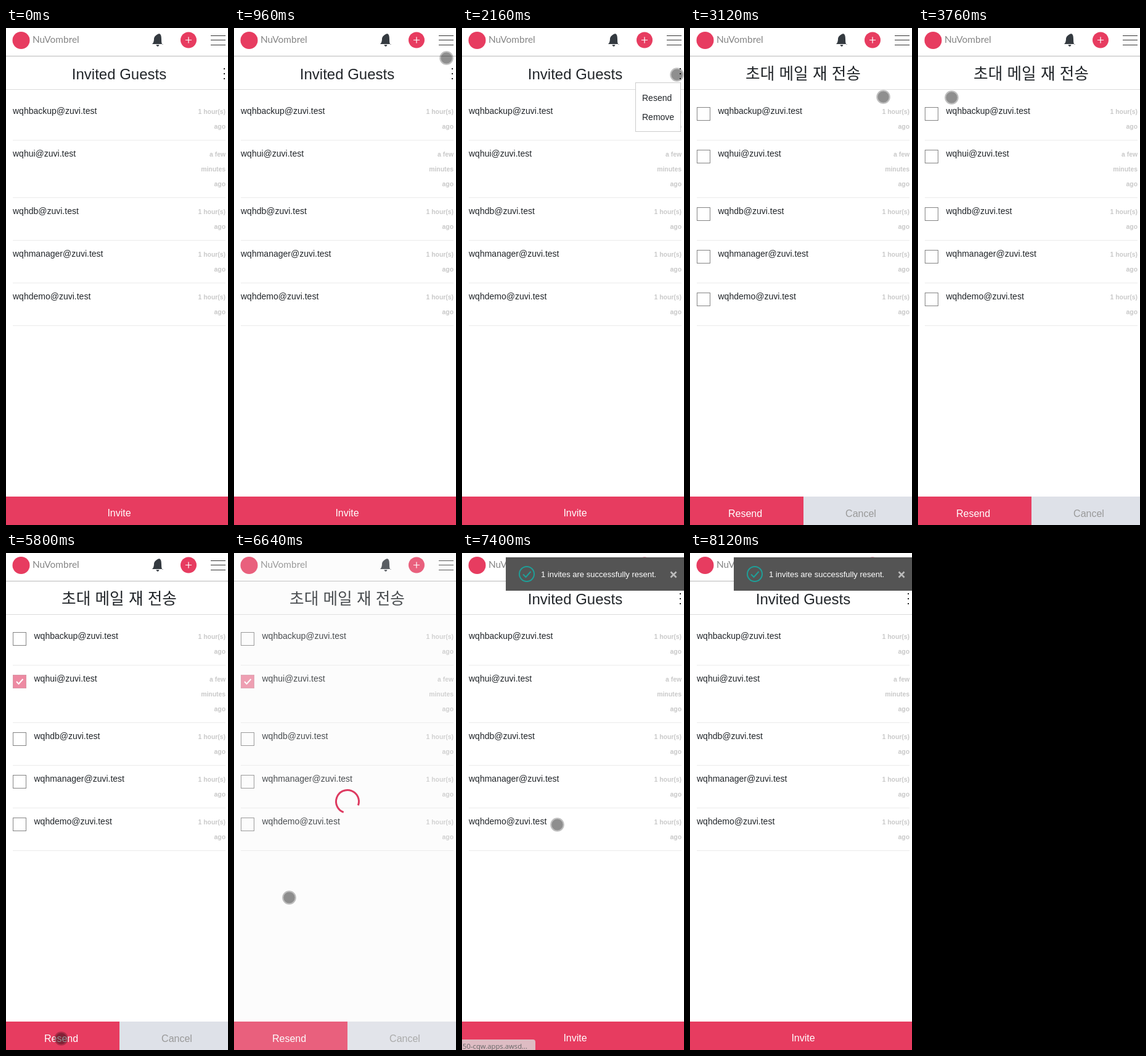
Animation, 360 px wide and 804 px high, one loop 9.56 s. Source, as an HTML page:

```html
<!DOCTYPE html>
<html lang="en">
<head>
<meta charset="utf-8">
<title>Invited guests</title>
<style>
  html, body { margin: 0; width: 100%; height: 100%; overflow: hidden; background: #fff; }
  svg { display: block; width: 100%; height: 100%; }
  text { font: 14px "Liberation Sans", Arial, sans-serif; fill: #212529; }
  .title { font-size: 24px; }
  .korean { font-size: 25.7px; font-weight: 300; font-family: "Liberation Sans", "Noto Sans CJK KR", "Noto Sans CJK", sans-serif; }
  .age { font-size: 10.4px; font-weight: bold; fill: #c9c9c9; }
  .button { font-size: 16px; fill: #fff; }
  .muted { fill: #999; }
  .brand { font: 15.4px Lato, sans-serif; fill: #858585; }
  .notice { font-size: 13px; fill: #fff; }
  .status { font: 11.3px "Open Sans", sans-serif; fill: #666; }
</style>
</head>
<body>
<svg viewBox="0 0 360 804" id="stage"></svg>
<script>
const LOOP = 9560, STEP = 40;
const PINK = '#e73c60';

// Moments at which the interface changes, in ms
const MENU_OPEN = 1920, SELECT_PAGE = 3000, TICK = 4280, LOADING = 5920,
      LOADED = 6840, NOTICE = 6960, STATUS_OFF = 7640;

// Each row is as tall as its age text
const HOUR = ['1 hour(s)', 'ago'], MINUTES = ['a few', 'minutes', 'ago'];
const LINE = 24, ROW_GAP = 21;
let rowTop = 128;
const guests = ['backup', 'ui', 'db', 'manager', 'demo'].map(role => {
  const age = role === 'ui' ? MINUTES : HOUR;
  const guest = { mail: `wqh${role}@zuvi.test`, age, y: rowTop };
  rowTop += ROW_GAP + LINE * age.length;
  return guest;
});

// Where the pointer goes; it rests where it leaves later than it arrives
const stop = (x, y, arrive, leave = arrive) => ({ x, y, arrive, leave });
const stops = [
  stop(184, 244, 320),
  stop(344, 48, 960),
  stop(360, 82, 1320, 1480),
  stop(358, 75, 1640, 2120),    // menu button
  stop(348, 75, 2160),
  stop(313, 111, 2480, 3120),   // menu entry
  stop(54, 112, 3760),
  stop(22, 207, 4120, 4440),    // checkbox
  stop(14, 417, 5040),
  stop(89, 785, 5760, 6080),    // resend button
  stop(89, 557, 6640),
  stop(154, 439, 7400),
  stop(190, 330, 7760),
  stop(335, 312, 8120)
];

const text = (x, y, content, cls = '', anchor = 'start') =>
  `<text x="${x}" y="${y}" class="${cls}" text-anchor="${anchor}">${content}</text>`;
const rect = (x, y, w, h, fill, extra = '') =>
  `<rect x="${x}" y="${y}" width="${w}" height="${h}" fill="${fill}" ${extra}/>`;
const line = (d, color, width = 1, extra = '') =>
  `<path d="${d}" fill="none" stroke="${color}" stroke-width="${width}" ${extra}/>`;
const circle = (x, y, r, fill, extra = '') =>
  `<circle cx="${x}" cy="${y}" r="${r}" fill="${fill}" ${extra}/>`;
const group = (id, ...parts) => `<g id="${id}">${parts.join('')}</g>`;

const header = [
  circle(24.5, 20, 14, PINK),
  text(43, 24, 'NuVombrel', 'brand'),
  '<path fill="#343a40" d="M237 26Q240 23 240 18T246 10T252 18T255 26ZM243.5 27.3H248.5Q248 30 246 30T243.5 27.3Z"/>',
  circle(296, 19.5, 13, PINK),
  line('M291 19.5h10m-5 -5v10', '#fff', 1.2),
  line('M332 12.5h24m-24 7h24m-24 8h24', '#333'),
  rect(0, 45, 360, 1, '#b9b9b9'),
  rect(0, 99, 360, 1, '#dcdcdc')
];

const ages = guests.map(({ y, age }) =>
  age.map((part, i) => text(356, y + 11 + i * LINE, part, 'age', 'end')).join('') +
  rect(11, y + 5 + age.length * LINE, 345, 1, '#ebebeb'));

const mails = x => guests.map(({ mail, y }) => text(x, y + 11, mail)).join('');

const checkbox = (y, fill, stroke) => rect(11.5, y + .5, 21, 21, fill, `stroke="${stroke}"`);

document.getElementById('stage').innerHTML = [
  rect(0, 0, 360, 804, '#fff'),
  ...header, ...ages,
  group('listPage',
    text(183.5, 83, 'Invited Guests', 'title', 'middle'),
    line('M354 65v20', '#222', 2, 'stroke-dasharray="2 6"'),
    mails(11),
    rect(0, 758, 360, 46, PINK),
    text(183.5, 790, 'Invite', 'button', 'middle')),
  group('selectPage',
    text(183.5, 82.5, '초대 메일 재 전송', 'korean', 'middle'),
    mails(45.5),
    ...guests.map(({ y }) => checkbox(y, '#fff', '#858585')),
    group('tick',
      checkbox(guests[1].y, '#ed8aa2', '#d995a5'),
      line('M17 208l3.5 3.7l7 -7.7', '#fff', 2)),
    rect(0, 758, 184, 46, PINK),
    rect(184, 758, 176, 46, '#dee1e8'),
    text(89.5, 791, 'Resend', 'button', 'middle'),
    text(277, 791, 'Cancel', 'button muted', 'middle')),
  group('menu',
    rect(281.5, 88.5, 73, 79, '#fff', 'stroke="#ccc"'),
    text(292, 118, 'Resend'), text(292, 149, 'Remove')),
  group('loader',
    rect(0, 0, 360, 804, '#efefef', 'opacity=".2"'),
    line('M18.5 0A18.5 18.5 0 1 1 0 -18.5', '#dd3a60', 3, 'id="spinner"')),
  group('notice',
    rect(71, 7, 289, 54, '#545454'),
    circle(105, 34, 12, 'none', 'stroke="#1f9f98" stroke-width="2"'),
    line('M99 34.5l4.5 4.5l8 -9', '#1f9f98', 2),
    text(128, 39, '1 invites are successfully resent.', 'notice'),
    line('M338.5 30.5l9 9m0 -9l-9 9', '#bbb', 2.6)),
  group('status',
    '<path d="M0 787H115Q119 787 119 791V804H0Z" fill="#dcdcdc" opacity=".8"/>',
    text(1, 802, '50-cqw.apps.awsd...', 'status')),
  group('pointer',
    circle(.5, .5, 9.3, '#000', 'opacity=".44"'),
    circle(.5, .5, 10.3, 'none', 'stroke="#000" stroke-width="2" opacity=".25"'))
].join('');

const part = id => document.getElementById(id);
const clamp = v => Math.max(0, Math.min(1, v));
const show = (id, visible) => part(id).setAttribute('display', visible ? 'inline' : 'none');
const fade = (id, since, duration) => part(id).setAttribute('opacity', clamp((since + STEP) / duration));

// Speed through a stop: zero at rests and at both ends, else the slope between its neighbours
function speed(i, axis) {
  const before = stops[i - 1], here = stops[i], after = stops[i + 1];
  if (!before || !after || here.leave > here.arrive) return 0;
  return (after[axis] - before[axis]) / (after.arrive - before.leave);
}

function pointerAt(t) {
  const i = Math.max(1, stops.findIndex(s => s.leave >= t));
  const from = stops[i - 1], to = stops[i];
  const span = to.arrive - from.leave;
  const k = clamp((t - from.leave) / span);
  const blend = k * k * (3 - 2 * k);
  return ['x', 'y'].map(axis =>
    from[axis] + (to[axis] - from[axis]) * blend +
    span * k * (1 - k) * (speed(i - 1, axis) * (1 - k) - speed(i, axis) * k));
}

function draw(t) {
  const selecting = t >= SELECT_PAGE && t < LOADED;
  show('listPage', !selecting);
  show('selectPage', selecting);
  show('tick', t >= TICK);

  show('menu', t >= MENU_OPEN && t < SELECT_PAGE);
  fade('menu', t - MENU_OPEN, 120);

  show('loader', t >= LOADING && t < LOADED);
  fade('loader', t - LOADING, 200);
  part('spinner').setAttribute('transform',
    `translate(184 402) rotate(${110 + (t - 6640) * .36})`);

  show('notice', t >= NOTICE);
  fade('notice', t - NOTICE, 200);
  show('status', t >= NOTICE && t < STATUS_OFF);

  const pointing = t >= stops[0].arrive && t < stops[stops.length - 1].arrive;
  show('pointer', pointing);
  if (pointing) part('pointer').setAttribute('transform', `translate(${pointerAt(t)})`);
}

const start = performance.now();
function tick() {
  const t = (performance.now() - start) % LOOP;
  draw(Math.floor(t / STEP) * STEP);
  requestAnimationFrame(tick);
}
tick();
</script>
</body>
</html>
```
